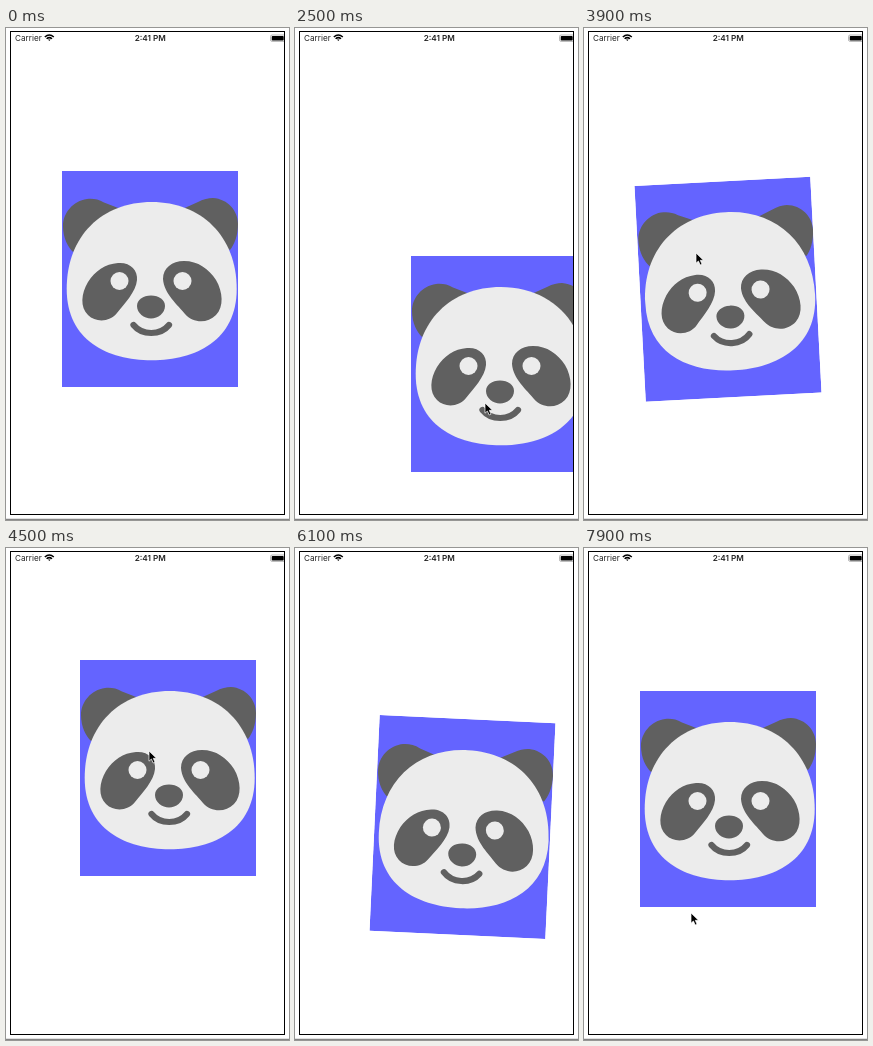
Recreate the animation shown at these times as an HTML page. Size 283x492 px, loop 8 s.

```html
<!DOCTYPE html>
<html lang="en">
<head>
<meta charset="utf-8">
<title>Draggable card</title>
<style>
html, body { margin: 0; width: 100%; height: 100%; overflow: hidden; background: #fff; }
svg { display: block; width: 100vw; height: 100vh; }
text { font-family: Inter, Roboto, sans-serif; font-size: 8.2px; fill: #222; }
</style>
</head>
<body>
<svg viewBox="0 0 283 492">
  <defs>
    <clipPath id="screen"><rect x="5" y="4" width="273.5" height="482.5"/></clipPath>
    <clipPath id="face"><rect x="56" y="143" width="176" height="216"/></clipPath>
  </defs>
  <rect width="283" height="492" fill="#fff"/>
  <g clip-path="url(#screen)">
    <g id="card">
      <g clip-path="url(#face)">
        <rect x="56" y="143" width="176" height="216" fill="#6464ff"/>
        <g fill="#606060">
          <path d="M120 183L98 174.5C92 171 87 170.5 81 171C67 173 57 185 57 198C57 210 62 219 67 224Z"/>
          <path d="M172 183L192 174C198 171 202 170 207 170C222 171 232 183 232 196C232 208 228 217 224 222Z"/>
        </g>
        <path fill="#ececec" d="M145.7 174C195 174 230.7 208 230.7 261C230.7 312 190 332.3 145.7 332.3C101 332.3 60.7 312 60.7 261C60.7 208 96 174 145.7 174Z"/>
        <g fill="#606060">
          <path d="M112 235C124 234 132 242 131 252C130 264 118 276 111 285C104 294 90 295 82 287C74 279 75 266 82 254C89 243 99 236 112 235Z"/>
          <path d="M178 233C192 233 203 241 210 252C217 264 218 279 210 287C201 296 187 295 179 286C172 277 158 266 157 251C157 240 166 233 178 233Z"/>
          <path d="M145 267.5C153 267.5 159 272 159 278C159 285 152 290.5 145 290.5C138 290.5 131 285 131 278C131 272 137 267.5 145 267.5Z"/>
        </g>
        <path d="M127.5 297Q134 305 145.2 305Q156.500 305 163 297" fill="none" stroke="#606060" stroke-width="6.2" stroke-linecap="round"/>
        <g fill="#ececec"><circle cx="113.5" cy="253" r="9"/><circle cx="176.5" cy="253" r="9"/></g>
      </g>
    </g>
    <text x="9" y="13">Carrier</text>
    <text x="144.3" y="13.2" text-anchor="middle" font-weight="600" fill="#000">2:41 PM</text>
    <g fill="none" stroke="#000" stroke-width="1.5">
      <path d="M38.8 9Q43.3 5 47.8 9M40.6 10.8Q43.3 8.4 46 10.8"/>
      <path d="M42 11.4H44.6L43.3 12.9Z" fill="#000" stroke="none"/>
    </g>
    <rect x="264.500" y="7" width="16" height="6.4" rx="1.6" fill="none" stroke="#999" stroke-width=".7"/>
    <rect x="265.7" y="8" width="12" height="4.5" rx=".8"/>
    <path id="cursor" d="M0 0V10.2L2.4 8L4.2 12L6 11.2L4.3 7.3H7.5Z" stroke="#fff" stroke-width=".7"/>
  </g>
  <rect x="4.5" y="3.5" width="274" height="483" fill="none" stroke="#000"/>
  <path d="M0 491.3H283" stroke="#666"/>
</svg>
<script>
const LOOP = 8000, STEP = 100;
const DRAG = 600, SWING = 300, SETTLE = 200;
const ENTER = 400, ENTRY = [184, 446], EXIT = [107, 365];

// Each drag is pulled from `hold` by `pull`, let go, swings past home and settles.
const drags = [
  { grab: 600, hold: [170, 300], pull: [13, 147], swing: [15, -22], tilt: 4.1 },
  { grab: 1900, hold: [130, 290], pull: [60, 85] },
  { grab: 3000, hold: [112, 310], pull: [0, -85] },
  { grab: 4200, hold: [125, 234], pull: [36, -62] },
  { grab: 5200, hold: [190, 262], pull: [100, 130], swing: [23.5, 28], tilt: 2.7 },
  { grab: 6700, hold: [165, 271], pull: [-88, 272] }
];

const card = document.getElementById('card');
const cursor = document.getElementById('cursor');

function ease(t, from, span) {
  const k = Math.min(1, Math.max(0, (t - from) / span));
  return k * k * (3 - 2 * k);
}
const mix = (a, b, k) => a.map((v, i) => v + (b[i] - v) * k);
const add = (a, b) => a.map((v, i) => v + b[i]);

function cardPose(t, d) {
  const { grab, pull, tilt = -3, swing = pull.map(v => v * -.12) } = d;
  const release = grab + DRAG;
  const pulled = mix([0, 0, 0], [...pull, 0], ease(t, grab, DRAG));
  const swung = mix(pulled, [...swing, tilt], ease(t, release, SWING));
  return mix(swung, [0, 0, 0], ease(t, release + SWING, SETTLE));
}

function cursorTip(t, d, next) {
  if (t < d.grab) return mix(ENTRY, d.hold, ease(t, ENTER, d.grab - ENTER));
  const pulled = add(d.hold, mix([0, 0], d.pull, ease(t, d.grab, DRAG)));
  const free = d.grab + DRAG + SWING;
  const [goal, arrive] = next ? [next.hold, next.grab] : [EXIT, LOOP - STEP];
  return mix(pulled, goal, ease(t, free, arrive - free));
}

function draw(now) {
  const t = Math.floor((now % LOOP) / STEP) * STEP;
  const i = Math.max(0, drags.filter(d => d.grab <= t).length - 1);
  const [dx, dy, tilt] = cardPose(t, drags[i]);
  card.setAttribute('transform', `translate(${dx} ${dy}) rotate(${tilt} 144 251)`);
  cursor.setAttribute('visibility', t < ENTER ? 'hidden' : 'visible');
  cursor.setAttribute('transform', `translate(${cursorTip(t, drags[i], drags[i + 1])})`);
}

const start = performance.now();
function tick() {
  draw(performance.now() - start);
  requestAnimationFrame(tick);
}
tick();
</script>
</body>
</html>
```
